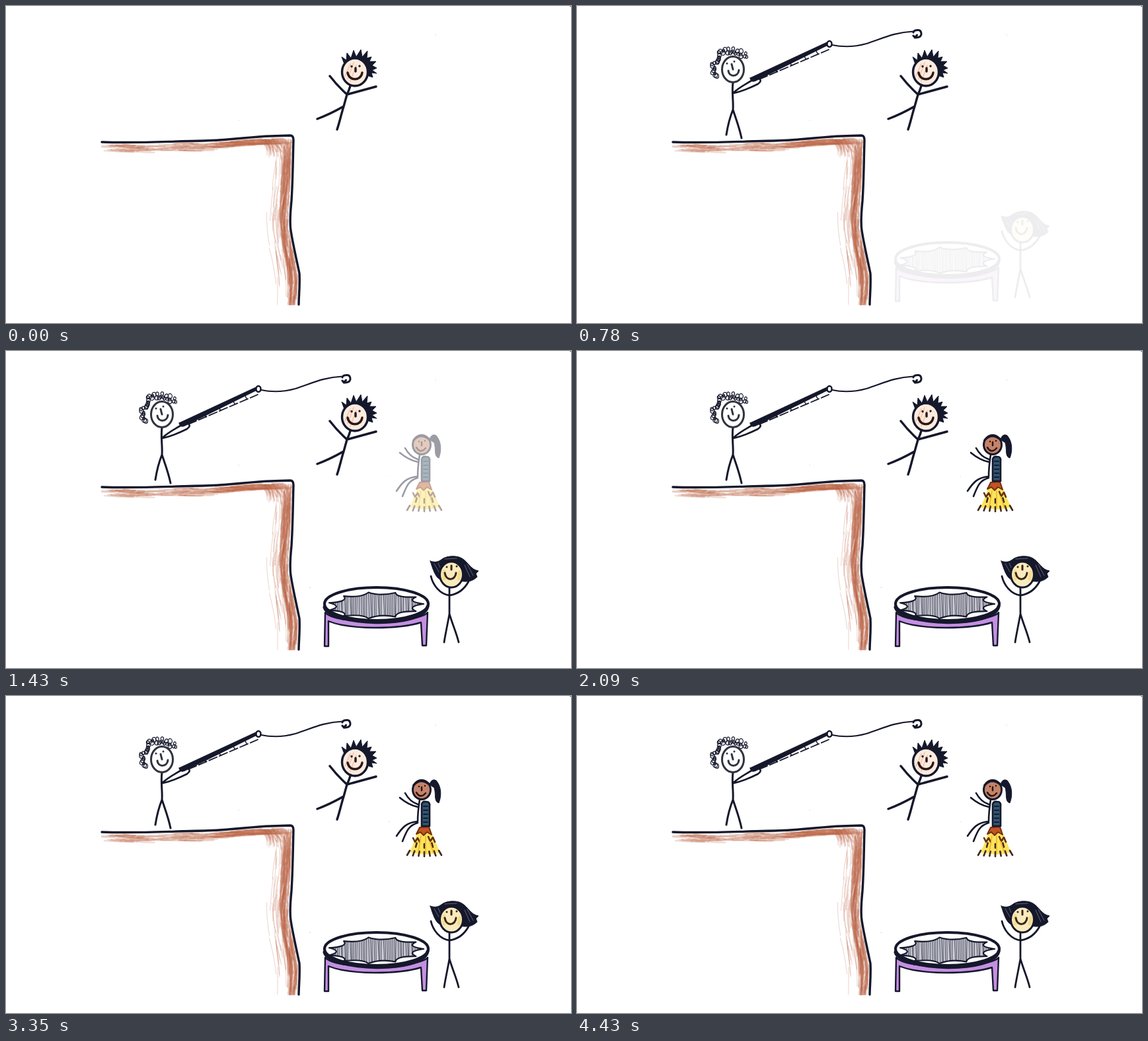
These frames come from a looping animation (855x480 px, 4470 ms). An HTML page:

```html
<!DOCTYPE html>
<html lang="en">
<head>
<meta charset="utf-8">
<title>Cliff jump</title>
<style>
  html, body { margin: 0; width: 100%; height: 100%; overflow: hidden; background: #fff; }
  svg { display: block; width: 100%; height: 100%; }
  g { fill: none; stroke: #15182b; stroke-width: 3.4; stroke-linecap: round; stroke-linejoin: round; }
  .ink { fill: #15182b; stroke-width: 1; }
  .face { stroke-width: 3; }
  .thin { stroke-width: 1.3; }
  .soil path { stroke: #bb6546; }
</style>
</head>
<body>
<svg viewBox="0 0 855 480">
  <g id="cliff">
    <g class="soil" id="soil"></g>
    <path id="edge" d="M145 206C200 208 240 205 300 204C340 203 370 198 400 197L430 196Q435 196 435 203C434 240 434 265 432 295C430 315 429 328 431 340C434 360 440 385 444 405C445 425 443 440 443 452"/>
    <path d="M854 0h1" stroke-width="1.5"/>
    <path d="M650 44h.1M352 173h.1" stroke="#bbb" stroke-width="1.2"/>
  </g>

  <g id="boy">
    <path d="M521 121Q519 128 516 134L511 152M490 106C497 115 506 125 516 134L560 122M511 152Q490 164 471 171M511 152C507 165 505 175 501 187"/>
    <path class="ink" d="M512 88L508 77L515 82L516 71L522 79L526 67L530 77L537 66L539 77L547 68L546 79L553 77L550 84L560 84L554 90L561 94L554 97L561 102L553 101L555 108L546 105C550 93 542 82 530 80C521 79 515 83 512 88Z"/>
    <ellipse cx="528" cy="100" rx="19.500" ry="21" fill="#fcebdf"/>
    <path d="M513 106l8-18M517 110l9-24M521 114l9-24" stroke="#eda98c" stroke-width="2" opacity=".5"/>
    <path d="M523 91.500v.1M535 91v.1M529 94v5" stroke="#2b1713"/>
    <path d="M517 101C519 114 537 114 539 101" stroke="#2b1713"/>
  </g>

  <g id="angler">
    <path d="M236 116C234 130 237 144 236 157C230 172 228 182 226 195M236 157C241 172 246 185 249 200" stroke-width="3"/>
    <path d="M237 131C246 123 255 118 266 112M237 132C250 129 262 124 274 118Q281 113 275 109" stroke-width="2.600"/>
    <g class="thin" id="curls"></g>
    <ellipse class="face" cx="236" cy="96" rx="16.500" ry="19.500" fill="#fff" stroke="#30333f"/>
    <path d="M227 87v.1M238 84v.1M234 88l2 8" stroke="#30333f" stroke-width="3"/>
    <path d="M229 98C230 108 244 108 245 97" stroke="#30333f" stroke-width="3"/>
    <path class="ink" d="M262 109L378 55L380 59L271 113Q263 117 262 109Z"/>
    <path d="M276 111L381 66" stroke-width="1.800" stroke-dasharray="13 4"/>
    <path d="M300 96l3 4M322 86l3 4M344 76l2 4M362 68l2 4" stroke-width="1.500"/>
    <ellipse cx="382" cy="57.500" rx="3.500" ry="4.500" fill="#fff" stroke-width="2.500"/>
    <path d="M386 59C405 63 420 62 438 57C465 48 480 40 509 38.500" stroke-width="2.200"/>
    <path d="M509 40Q510 36 517 36.500Q521 37 521 43Q520 48 512 48M509 45l2.500 3l3-4" stroke-width="3"/>
  </g>

  <g id="catcher">
    <path d="M460 358h.1" stroke="#aaa" stroke-width="1.200"/>
    <path d="M483 396L482 447H488V409C522 423 596 421 628 411L630 446H636L638 396C626 412 500 416 483 396Z" fill="#c48fe2" stroke-width="2.400"/>
    <ellipse cx="560.500" cy="383" rx="78.500" ry="25" fill="#fff" stroke-width="4.200"/>
    <path d="M482 388C490 416 630 421 638 387" stroke-width="5"/>
    <clipPath id="bedClip"><path id="bedShape"/></clipPath>
    <g clip-path="url(#bedClip)">
      <path d="M480 355H640V412H480Z" fill="#c9c9d2" stroke="none"/>
      <path id="weave" stroke="#4c4f60" stroke-width="1"/>
    </g>
    <path id="bed" stroke-width="2.200"/>
    <path d="M671 358V398C668 415 665 428 663 441M671 398C676 415 682 428 685 441M643 341C646 354 656 368 671 370C685 368 694 360 700 349" stroke-width="2.800"/>
    <path class="ink" d="M642 318C650 321 655 319 660 315C667 310 682 309 690 314C699 319 703 331 715 333L711 337L713 342Q705 350 694 349L657 346C650 343 646 331 642 318Z"/>
    <path d="M648 322l8 14M654 321l3 7M664 315l18-1M694 324l8 18M698 323l9 17" stroke="#777a8a" stroke-width=".8"/>
    <ellipse class="face" cx="674" cy="338.500" rx="17.500" ry="19.500" fill="#f9ebbd"/>
    <path d="M663 345V333M685 345l2-10" stroke="#f0d068" stroke-width="5" opacity=".5"/>
    <path d="M667 327v.1M682 326v.1M674 325v6M664 336C666 349 680 348 681 336" stroke="#3a2615" stroke-width="3"/>
  </g>

  <g id="flyer">
    <path d="M580 190h.1" stroke="#bbb" stroke-width="1.200"/>
    <path d="M626 199L611 237L636 240L657 237L640 198Z" fill="#fbe45c" stroke="none"/>
    <path d="M626 199L621 209L627 206L632 211L637 206L644 210L640 198Z" fill="#c45324" stroke="#713011" stroke-width="2"/>
    <path d="M616 215l3 6l4-6l3 6M639 213l3 7l4-6l3 7" stroke="#623014" stroke-width="2.600"/>
    <path id="sparks" stroke="#44291a" stroke-width="2.600"/>
    <path d="M628 212l-4 24M635 212v26M641 220l6 18" stroke="#f0ad2c" stroke-width="1.500"/>
    <path d="M626 157C624 170 623 180 623 190C606 191 599 200 591 212M623 192C609 196 606 205 600 220M623 168Q609 165 596 154M623 164Q611 160 604 147" stroke-width="2.600"/>
    <path d="M629 197V164Q630 159 636 160Q642 160 641 167V197Z" fill="#31546f" stroke-width="2.600"/>
    <path d="M632 167h6M632 173h6M632 179h6M632 185h6M632 191h6" stroke="#101d30" stroke-width="2"/>
    <path class="ink" d="M641 134Q644 124 651 128C658 136 660 149 655 162C647 160 651 148 648 139Z"/>
    <ellipse class="face" cx="629" cy="142" rx="13.500" ry="14.500" fill="#c48369"/>
    <path d="M617 135Q627 123 641 134" stroke-width="3.500"/>
    <path d="M625 137v.1M634 136v.1M629 138v5M621 146Q627 156 635 147" stroke="#2b1510" stroke-width="2.500"/>
  </g>
</svg>
<script>
const $ = id => document.getElementById(id);
let seed = 7;
const rand = () => (seed = seed * 16807 % 2147483647) / 2147483647;

function add(parent, d, width, opacity) {
  const p = document.createElementNS("http://www.w3.org/2000/svg", "path");
  p.setAttribute("d", d);
  p.setAttribute("stroke-width", width);
  p.setAttribute("opacity", opacity);
  parent.append(p);
}

// Pencil strokes run along the cliff edge, offset towards the inside.
const edge = $("edge"), total = edge.getTotalLength(), corner = 290;
function pencil(from, length, offset, drift, width, opacity) {
  const to = Math.min(from + length, total);
  if (from < corner && to > corner) return;
  const spot = (s, off) => {
    const p = edge.getPointAtLength(s);
    return s < corner ? [p.x, p.y + off] : [p.x - off, p.y];
  };
  const mid = (from + to) / 2;
  add($("soil"), `M${spot(from, offset)}Q${spot(mid, offset + drift)} ${spot(to, offset + drift)}`, width, opacity);
}
for (let i = 0; i < 170; i++) {
  const s = rand() * 270;
  pencil(s, 15 + rand() * 35, 3 + rand() * (s < 150 ? 11 : 8), rand() * 2, 2.4, .22);
}
for (let i = 0; i < 200; i++) {
  pencil(corner + 4 + rand() * 245, 15 + rand() * 35, 3 + rand() * 11, rand() * 4, 2.4, .23);
}
for (let i = 0; i < 80; i++) {
  const s = corner + 8 + rand() * 215;
  pencil(s, 25 + rand() * 40, 9 + rand() * rand() * (s > 380 ? 34 : 24), rand() * 6 - 2, 1.2, .24);
}
for (let i = 0; i < 50; i++) {
  const x = 386 + rand() * 38, y = 201 + rand() * 9;
  add($("soil"), `M${x} ${y}Q${x + 8} ${y + 6} ${x + 12 - rand() * 6} ${y + 10 + rand() * 14}`, 2, .17);
}

// Curly hair: small loops along an arc around the head.
for (let i = 0; i < 36; i++) {
  const a = Math.PI * (.84 + i / 35 * .96), k = 1 + rand() * .4;
  const x = 234 + Math.cos(a) * 22 * k, y = 94 + Math.sin(a) * 22 * k, r = 1.5 + rand() * 1.8;
  add($("curls"), `M${x - r} ${y}a${r} ${r + .8} 0 1 1 ${2 * r} 0a${r} ${r} 0 1 1 ${-2 * r} 0`, 1.2, 1);
}

// Trampoline bed: scallops between the spring hooks.
const hooks = 11;
const onBed = (i, k) => {
  const a = Math.PI * 2 * i / hooks;
  return [559 + Math.cos(a) * 73 * k, 385 + Math.sin(a) * 20 * k - Math.cos(a) * 2];
};
let bed = "M" + onBed(0, 1);
for (let i = 0; i < hooks; i++) bed += `Q${onBed(i + .5, .66)} ${onBed(i + 1, 1)}`;
$("bed").setAttribute("d", bed);
$("bedShape").setAttribute("d", bed);
let weave = "";
for (let x = 484; x < 640; x += 2.8) weave += `M${x} 360l${rand() * 4 - 1} 48`;
$("weave").setAttribute("d", weave);

let sparks = "";
for (let i = 0; i < 7; i++) {
  const u = i / 6 * 2 - 1;
  sparks += `M${633 + u * 22} ${236 - Math.abs(u) * 2}l${u * 4} 7`;
  if (i % 2) sparks += `M${633 + u * 17} ${224 - Math.abs(u) * 2}l${u * 2.5} 6`;
}
$("sparks").setAttribute("d", sparks);

const loop = 4470, fadeTime = 450;
const starts = { angler: 260, catcher: 750, flyer: 1240 };
function draw(now) {
  const t = now % loop;
  for (const id in starts) {
    $(id).setAttribute("opacity", Math.max(0, Math.min(1, (t - starts[id]) / fadeTime)));
  }
  requestAnimationFrame(draw);
}
draw(0);
</script>
</body>
</html>
```
